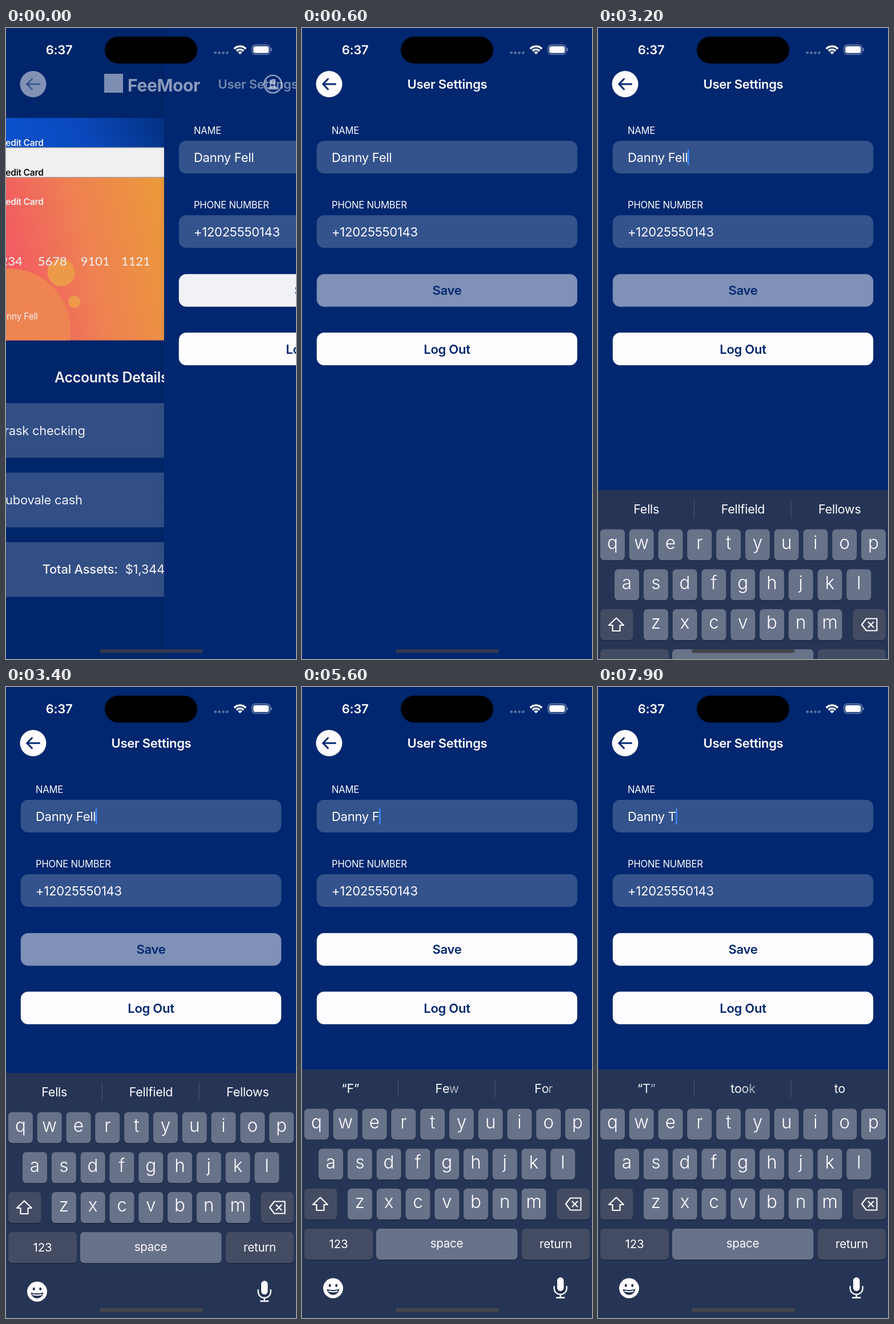
An HTML page with a canvas that plays this animation: 508x1102 px, repeating every 8000 ms.

```html
<!DOCTYPE html>
<html lang="en">
<head>
<meta charset="utf-8">
<title>User Settings</title>
<style>
html, body { margin: 0; width: 100%; height: 100%; overflow: hidden; background: #00276f; }
canvas { display: block; width: 508px; height: 1102px; }
</style>
</head>
<body>
<canvas id="stage" width="508" height="1102"></canvas>
<script>
const ctx = document.getElementById('stage').getContext('2d');
const W = 508, H = 1102, LOOP = 8000, STEP = 100;
const NAVY = '#00276f', WHITE = '#fefcff', PANEL = '#263555', KEY = '#687289', DARK_KEY = '#434c62';
const KEYBOARD_AT = 3100, SAVE_AT = 4500, SHIFT_AT = 7000, TYPE_AT = 7600;

// Each edit: time, name in the field, three keyboard suggestions.
const EDITS = [
  [0, 'Danny Fell', ['Fells', 'Fellfield', 'Fellows']],
  [4400, 'Danny Fel', ['“Fel”', 'Fell', 'Fell']],
  [4900, 'Danny Fe', ['“Fe”', 'Feel', 'Feet']],
  [5300, 'Danny F', ['“F”', 'Few', 'For']],
  [5900, 'Danny ', ['I', 'the', 'on']],
  [TYPE_AT, 'Danny T', ['“T”', 'took', 'to']]
];

const clamp = (v, lo = 0, hi = 1) => Math.min(hi, Math.max(lo, v));
const between = (t, a, b) => t >= a && t < b;
const easeInOut = p => p < 0.5 ? 2 * p * p : 1 - 2 * (1 - p) * (1 - p);
const spring = x => (1 + x) * Math.exp(-x); // critically damped, 1 to 0

function setFont(size, weight, family = 'Inter') {
  ctx.font = `${weight} ${size}px ${family}, sans-serif`;
  ctx.letterSpacing = family === 'Inter' ? `${-size * 0.012}px` : '0px';
}

function text(s, x, y, size = 22, weight = 400, color = WHITE, align = 'left', family) {
  setFont(size, weight, family);
  ctx.fillStyle = color;
  ctx.textAlign = align;
  ctx.fillText(s, x, y);
}

function box(x, y, w, h, r, color) {
  ctx.fillStyle = color;
  ctx.beginPath();
  ctx.roundRect(x, y, w, h, r);
  ctx.fill();
}

function disc(x, y, r, color) {
  ctx.fillStyle = color;
  ctx.beginPath();
  ctx.arc(x, y, r, 0, Math.PI * 2);
  ctx.fill();
}

function line(points, width, color, close = false, fill = false) {
  ctx.beginPath();
  points.forEach(([x, y]) => ctx.lineTo(x, y));
  if (close) ctx.closePath();
  ctx.lineWidth = width;
  ctx.lineCap = ctx.lineJoin = 'round';
  ctx.strokeStyle = ctx.fillStyle = color;
  if (fill) ctx.fill();
  ctx.stroke();
}

function gradient(x0, y0, x1, y1, ...colors) {
  const g = ctx.createLinearGradient(x0, y0, x1, y1);
  colors.forEach((c, i) => g.addColorStop(i / (colors.length - 1), c));
  return g;
}

function withAlpha(a, draw) {
  ctx.save();
  ctx.globalAlpha = a;
  draw();
  ctx.restore();
}

function statusBar() {
  text('6:37', 93, 46, 22, 600, WHITE, 'center');
  box(173, 15, 162, 47, 23.5, '#000');
  for (let i = 0; i < 4; i++) box(364.5 + i * 6.9, 41, 4.6, 4.6, 1.5, '#566c9d');
  ctx.strokeStyle = WHITE;
  ctx.lineCap = 'butt';
  [[14, 3.4], [8.6, 3.2], [2.6, 5.2]].forEach(([r, width]) => {
    ctx.lineWidth = width;
    ctx.beginPath();
    ctx.arc(410, 46, r, -Math.PI * 0.76, -Math.PI * 0.24);
    ctx.stroke();
  });
  ctx.lineWidth = 1.4;
  ctx.strokeStyle = '#7286b0';
  ctx.beginPath();
  ctx.roundRect(431, 29.5, 31.5, 16.5, 5.5);
  ctx.stroke();
  box(433.2, 31.7, 27.2, 12.1, 3.5, WHITE);
  box(464, 35, 2, 5.6, 1, '#7286b0');
}

function backButton() {
  disc(47.5, 98, 23, WHITE);
  line([[58.5, 98], [37, 98]], 3, NAVY);
  line([[45.5, 89], [36.8, 98], [45.5, 107]], 3, NAVY);
}

function homeHeader() {
  box(172, 80, 33, 33, 0, '#e4e8f1');
  text('FeeMoor', 213, 111, 30, 700);
  ctx.strokeStyle = WHITE;
  ctx.lineWidth = 2.6;
  ctx.beginPath();
  ctx.arc(467.5, 98, 15.2, 0, Math.PI * 2);
  ctx.stroke();
  disc(467.5, 94, 5, WHITE);
  ctx.beginPath();
  ctx.ellipse(467.5, 107.5, 9.5, 6.5, 0, Math.PI, 0);
  ctx.fill();
}

function cards() {
  const label = (y, color) => text('Credit Card', 135, y, 15.5, 600, color, 'right');
  box(26, 157, 456, 200, 12, gradient(60, 260, 346, 150, '#0d57dc', '#0b4dc8', '#033488'));
  label(205.5, WHITE);
  box(26, 208, 456, 200, 12, '#8a93a8');
  box(26, 209.5, 456, 200, 12, '#fcfcfe');
  label(257.5, '#0a0a0c');
  box(26, 260, 456, 200, 12, '#b9a7a5');
  ctx.save();
  ctx.beginPath();
  ctx.roundRect(26, 261.5, 456, 284, 12);
  ctx.clip();
  ctx.fillStyle = gradient(50, 400, 360, 330, '#ff586a', '#fa8756', '#f7a23c');
  ctx.fillRect(26, 261, 456, 285);
  disc(74, 529, 109, '#fa8a56');
  disc(166, 427, 24, '#f9a04e');
  disc(189, 478, 10.7, '#f99f4e');
  ctx.restore();
  label(309, WHITE);
  text('1234', 98, 415, 22, 400, WHITE, 'right', 'Lato');
  [['5678', 125], ['9101', 200], ['1121', 271]].forEach(([s, x]) =>
    text(s, x, 415, 22, 400, WHITE, 'left', 'Lato'));
  text('Danny Fell', 125, 508.5, 15.5, 400, WHITE, 'right');
}

function homeScreen() {
  ctx.fillStyle = NAVY;
  ctx.fillRect(0, 0, W + 160, H);
  cards();
  text('Accounts Details', 254, 619, 25, 600, WHITE, 'center');
  [655, 776.5, 898].forEach(y => box(26, y, 456, 95.5, 12, 'rgba(255,255,255,.2)'));
  text('Brask checking', 52, 711);
  text('Nubovale cash', 52, 832);
  text('Total Assets:', 133, 953, 22, 500);
  text('$1,344', 278, 953);
}

function field(label, value, y) {
  text(label, 52, y - 12, 16.6);
  box(25.8, y, 456.4, 57, 13, 'rgba(255,255,255,.205)');
  text(value, 52, y + 37);
}

function button(label, y, alpha) {
  box(25.8, y, 456.4, 57, 13, `rgba(254,252,255,${alpha})`);
  text(label, 254, y + 36.5, 22, 600, NAVY, 'center');
}

function saveAlpha(t) {
  if (t < SAVE_AT) return 0.5 + 0.45 * Math.pow(clamp(1 - t / 350), 1.4);
  return 0.5 + 0.5 * easeInOut(clamp((t - SAVE_AT) / 400));
}

function caretOn(t) {
  return t >= KEYBOARD_AT && !between(t, 3700, 4000) && !between(t, 6500, 6700);
}

function settingsScreen(t, name) {
  ctx.fillStyle = NAVY;
  ctx.fillRect(0, 0, W, H);
  field('NAME', name, 197);
  if (caretOn(t)) {
    setFont(22, 400);
    box(52 + ctx.measureText(name).width - 0.6, 212, 2.6, 28, 1.3, '#3d87f7');
  }
  field('PHONE NUMBER', '+12025550143', 327);
  button('Save', 429.8, saveAlpha(t));
  button('Log Out', 532, 1);
}

// Letters leave and arrive one after another; shared letters stay solid.
function suggestion(from, to, cx, p) {
  setFont(21.5, 400);
  const width = s => ctx.measureText(s).width;
  const start = s => cx - width(s) / 2;
  const letter = (s, i, x, a) => withAlpha(clamp(a), () =>
    text(s[i], x + width(s.slice(0, i)), 709, 21.5));
  if (p >= 1 || from === to) return text(to, cx, 709, 21.5, 400, WHITE, 'center');
  const shrinks = from.startsWith(to);
  const keep = shrinks ? to.length : 0;
  const rest = from.length - keep;
  for (let i = keep; i < from.length; i++)
    letter(from, i, start(from), 1.45 - 2 * p - 0.4 * (i - keep) / rest);
  for (let i = 0; i < to.length; i++) {
    const lag = i / Math.max(1, to.length - 1);
    const shared = i < keep || from.includes(to[i]);
    letter(to, i, shrinks ? start(from) : start(to), shared ? 1 : p * 2 - 0.3 - 0.6 * lag);
  }
}

function key(x, y, w, color) {
  box(x, y + 1.6, w, 54, 6.5, '#1b2742');
  box(x, y, w, 54, 6.5, color);
}

function shiftIcon(color, fill) {
  line([[32, 891.5], [45, 904], [38.5, 904], [38.5, 914], [25.5, 914], [25.5, 904], [19, 904]],
    2.2, color, true, fill);
}

function deleteIcon(lit) {
  line([[470, 892.5], [488.5, 892.5], [488.5, 913.5], [470, 913.5], [462, 903]], 2.2, WHITE, true, lit);
  const cross = lit ? KEY : WHITE;
  line([[473.5, 898.5], [482.5, 907.5]], 2.2, cross);
  line([[482.5, 898.5], [473.5, 907.5]], 2.2, cross);
}

function smiley() {
  disc(54.5, 1050, 17.5, WHITE);
  [48.8, 60.2].forEach(x => {
    ctx.fillStyle = PANEL;
    ctx.beginPath();
    ctx.ellipse(x, 1045.3, 2, 2.7, 0, 0, Math.PI * 2);
    ctx.fill();
  });
  ctx.beginPath();
  ctx.moveTo(43.5, 1051.5);
  ctx.quadraticCurveTo(54.5, 1054.5, 65.5, 1051.5);
  ctx.bezierCurveTo(63.5, 1065, 45.5, 1065, 43.5, 1051.5);
  ctx.fill();
  line([[47, 1055.2], [54.5, 1056.2], [62, 1055.2]], 2, WHITE);
}

function microphone() {
  box(447, 1031, 11.5, 24, 5.75, WHITE);
  ctx.strokeStyle = WHITE;
  ctx.lineWidth = 2.3;
  ctx.lineCap = 'round';
  ctx.beginPath();
  ctx.moveTo(441.7, 1047);
  ctx.lineTo(441.7, 1050);
  ctx.arc(452.7, 1050, 11, Math.PI, 0, true);
  ctx.lineTo(463.7, 1047);
  ctx.stroke();
  line([[452.7, 1061], [452.7, 1066.5]], 2.3, WHITE);
  line([[446, 1066.5], [459.5, 1066.5]], 2.3, WHITE);
}

function keyboard(t, index) {
  const [time, , words] = EDITS[index];
  const before = EDITS[Math.max(0, index - 1)][2];
  const progress = index ? clamp((t - time) / 400) : 1;
  const shifted = between(t, SHIFT_AT, TYPE_AT);
  const deleting = between(index, 1, 5) && t - time < 200;

  ctx.fillStyle = PANEL;
  ctx.fillRect(0, 668, W, H);
  words.forEach((word, i) => suggestion(before[i], word, 84.7 + i * 169.3, progress));
  [168.5, 338].forEach(x => box(x - 0.6, 685, 1.3, 32, 0, '#46526d'));

  ['qwertyuiop', 'asdfghjkl', 'zxcvbnm'].forEach((row, r) => {
    const x0 = [3.9, 29, 79.9][r], y = 736.5 + r * 69.8;
    [...row].forEach((c, i) => {
      const x = x0 + i * 50.8;
      key(x, y, 43, KEY);
      text(shifted ? c.toUpperCase() : c, x + 21.3, y + (shifted ? 38 : 34.3),
        shifted ? 29 : 31.5, 300, WHITE, 'center');
    });
  });
  key(4, 876, 57.5, shifted ? WHITE : DARK_KEY);
  shiftIcon(shifted ? '#000' : WHITE, shifted);
  key(446.5, 876, 57.5, deleting ? KEY : DARK_KEY);
  deleteIcon(deleting);

  key(4, 946, 120, DARK_KEY);
  key(130, 946, 247.5, KEY);
  key(385, 946, 119, DARK_KEY);
  text('123', 64, 980, 20.5, 400, WHITE, 'center');
  text('space', 253.5, 978.5, 20.5, 400, WHITE, 'center');
  text('return', 444.5, 980, 20.5, 400, WHITE, 'center');
  smiley();
  microphone();
}

function render(t) {
  let index = 0;
  while (index + 1 < EDITS.length && EDITS[index + 1][0] <= t) index++;

  const away = t >= 500 ? 0 : spring(1.538 + t * 0.017);
  const shift = away * W, arrived = 1 - away;
  if (away) {
    ctx.save();
    ctx.translate(-0.3 * W * arrived, 0);
    homeScreen();
    ctx.restore();
    ctx.fillStyle = `rgba(0,0,0,${0.1 * arrived})`;
    ctx.fillRect(0, 0, W, H);
    ctx.fillStyle = gradient(shift - 10, 0, shift, 0, 'rgba(0,0,0,0)', 'rgba(0,0,0,.04)');
    ctx.fillRect(shift - 10, 0, 10, H);
  }
  ctx.save();
  ctx.translate(shift, 0);
  settingsScreen(t, EDITS[index][1]);
  ctx.restore();

  if (away) withAlpha(away, homeHeader);
  withAlpha(clamp(arrived * 1.12), backButton);
  withAlpha(arrived, () =>
    text('User Settings', 254.5 + 0.675 * shift, 106, 22, 600, WHITE, 'center'));
  statusBar();

  if (t >= KEYBOARD_AT) {
    const drop = t > 3500 ? 0 : 434 * spring((t - KEYBOARD_AT + 18.7) * 0.01977);
    ctx.save();
    ctx.translate(0, Math.round(drop));
    keyboard(t, index);
    ctx.restore();
  }
  box(164, 1085, 180.5, 6.5, 3.2, t > KEYBOARD_AT ? '#44464b' : '#33394f');
}

const begin = performance.now();
function tick(now) {
  const t = Math.max(0, now - begin) % LOOP;
  render(Math.floor(t / STEP) * STEP);
  requestAnimationFrame(tick);
}
render(0);
requestAnimationFrame(tick);
</script>
</body>
</html>
```
